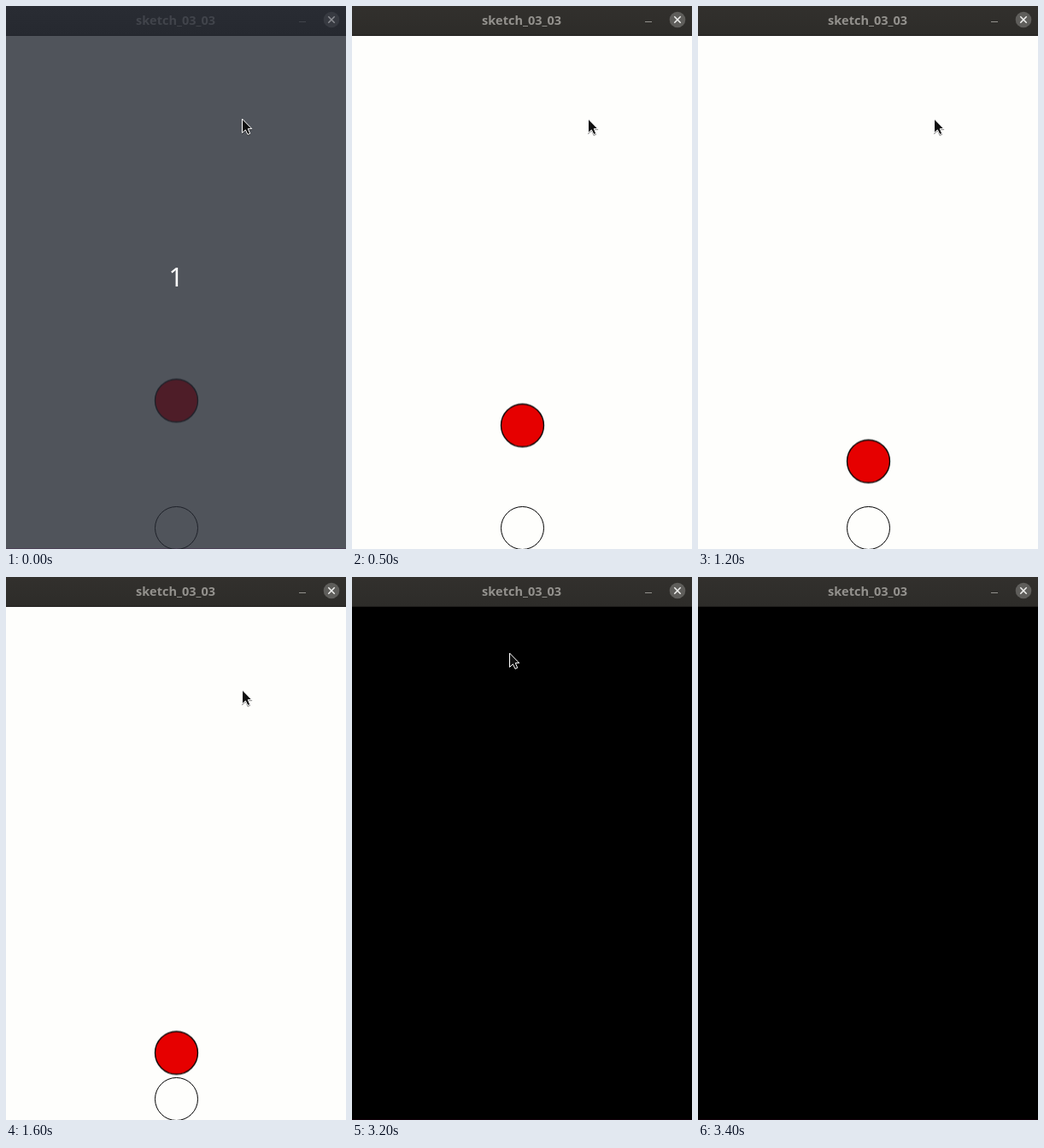
Write an HTML page that moves like this. It is 398 by 635 pixels and loops after 4.2 s.

```html
<!DOCTYPE html>
<html lang="en">
<head>
<meta charset="utf-8">
<title>sketch_03_03</title>
<style>
  html, body { margin: 0; width: 100%; height: 100%; overflow: hidden; background: #000; }

  svg {
    display: block;
    animation: palette 4.2s step-end -2ms infinite;
  }

  .sheet { fill: var(--sheet); }
  .bottom { fill: var(--bottom); }
  .bar-top { stop-color: var(--bar-top); }
  .bar-low { stop-color: var(--bar-low); }
  .edge { fill: var(--edge); }
  .title { fill: var(--title); font: bold 14.5px "Noto Sans", "Open Sans", sans-serif; text-anchor: middle; }
  .minimise { fill: var(--title); }
  .close { fill: var(--close); }
  .cross { stroke: var(--cross); stroke-width: 1.5; fill: none; }

  .scene { animation: scene 4.2s step-end -2ms infinite; }
  .scene circle { stroke: var(--ink); fill: none; }
  .scene .ball {
    fill: var(--ball);
    stroke-width: 1.35;
    animation: fall 4.2s step-end -2ms infinite;
  }
  .count {
    fill: #fff;
    font: 30px "Noto Sans", "Open Sans", sans-serif;
    text-anchor: middle;
    animation: count 4.2s step-end -2ms infinite;
  }
  .pointer {
    fill: #111;
    stroke: #fff;
    filter: drop-shadow(.6px 1px .6px #0007);
    animation: point 4.2s step-end -2ms infinite;
  }

  /* dimmed window, white sketch, black sketch */
  @keyframes palette {
    0% {
      --sheet: #50545b; --bottom: #4b4056; --ink: #1e2129; --ball: #4e1d28;
      --bar-top: #292c33; --bar-low: #262930; --edge: #23262d;
      --title: #41444b; --close: #373a41; --cross: #8b8d92;
    }
    2.3809% {
      --sheet: #fefefc; --bottom: #fefefc; --ink: #000; --ball: #e60000;
      --bar-top: #32302d; --bar-low: #2d2c29; --edge: #201f1d;
      --title: #93918d; --close: #5f5e5b; --cross: #f4f4f2;
    }
    40.4761%, 100% {
      --sheet: #000; --bottom: #12000a; --ink: #000; --ball: #000;
      --bar-top: #32302d; --bar-low: #2d2c29; --edge: #201f1d;
      --title: #93918d; --close: #5f5e5b; --cross: #f4f4f2;
    }
  }
  @keyframes scene {
    0% { visibility: visible; }
    40.4761%, 100% { visibility: hidden; }
  }
  @keyframes count {
    0% { opacity: 1; }
    2.3809%, 100% { opacity: 0; }
  }
  /* one jump every 100 ms */
  @keyframes fall {
    0% { transform: translateY(461.5px); }
    2.3809% { transform: translateY(466.5px); animation-timing-function: steps(5); }
    14.2857% { transform: translateY(496.5px); animation-timing-function: steps(3); }
    21.4285% { transform: translateY(517.5px); animation-timing-function: steps(3); }
    28.5714% { transform: translateY(532.5px); animation-timing-function: steps(4); }
    38.0952%, 100% { transform: translateY(556.5px); }
  }
  @keyframes point {
    0% { transform: translate(276px, 131px); }
    76.1904% { transform: translate(184px, 88px); }
    78.5714% { transform: translate(51px, 15px); }
    80.9523%, 100% { transform: translate(-60px, -60px); }
  }
</style>
</head>
<body>
<svg width="398" height="635" viewBox="0 0 398 635">
  <defs>
    <linearGradient id="bar" x2="0" y2="1">
      <stop class="bar-top"/>
      <stop class="bar-low" offset="1"/>
    </linearGradient>
  </defs>

  <rect class="sheet" width="398" height="635"/>
  <rect class="bottom" y="634" width="398" height="1"/>
  <g class="scene">
    <text class="count" x="199" y="328">1</text>
    <circle cx="199.5" cy="610.5" r="25"/>
    <circle class="ball" cx="199.5" r="25"/>
  </g>

  <rect width="398" height="35" fill="url(#bar)"/>
  <rect class="edge" y="34" width="398" height="1"/>
  <text class="title" x="198.5" y="22">sketch_03_03</text>
  <rect class="minimise" x="343" y="18" width="8" height="1"/>
  <circle class="close" cx="381" cy="16" r="9.3"/>
  <path class="cross" d="M377.3 12.3l7.4 7.4m0-7.4l-7.4 7.4"/>

  <path class="pointer" d="M.5 1V17.4L4.4 13.9L7 19.4L9.7 18.2L7.3 12.6H11.8z"/>
</svg>
</body>
</html>
```
